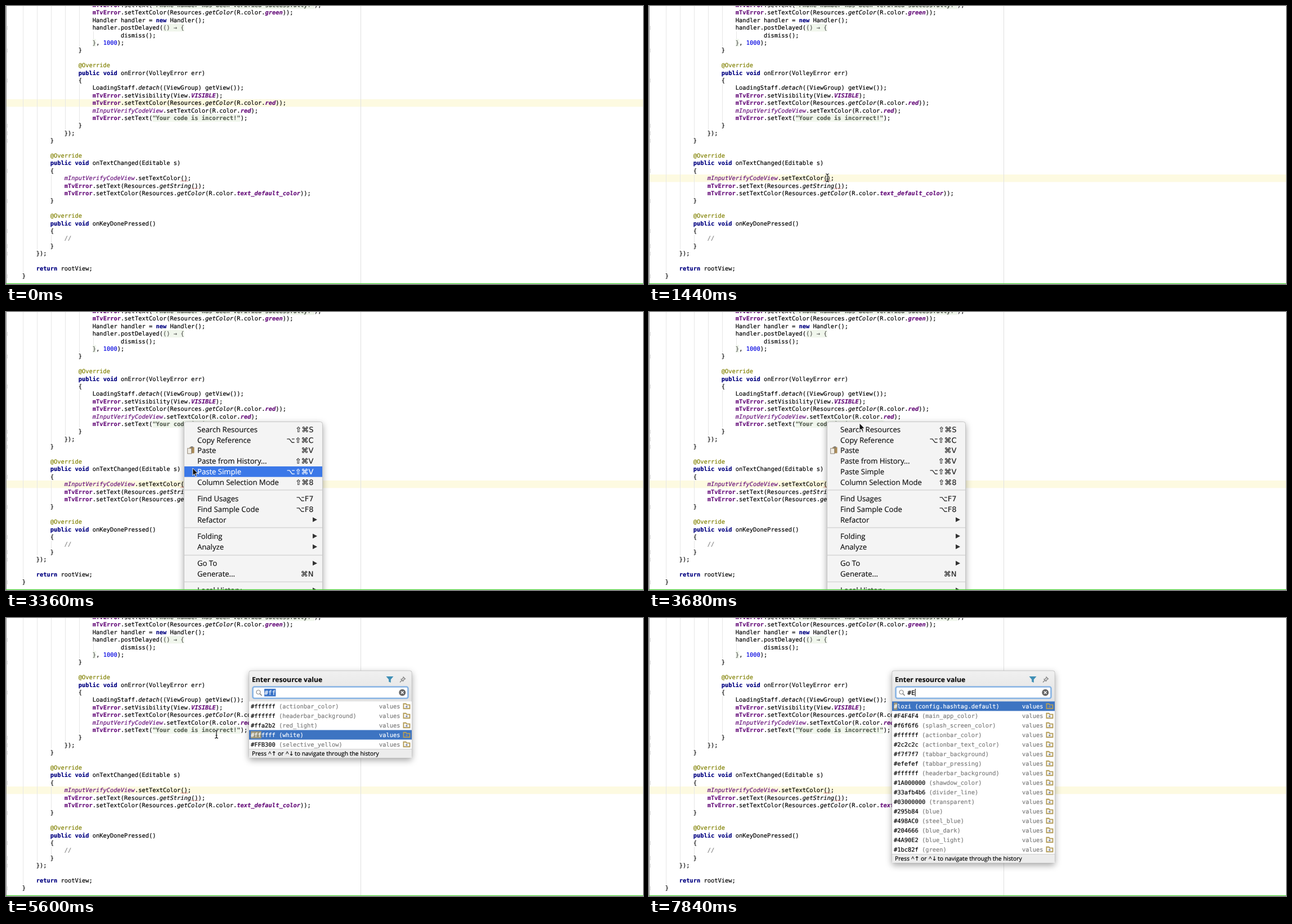
An HTML page that plays this animation: 1132x495 px, repeating every 8000 ms.

```html
<!DOCTYPE html>
<html lang="en">
<head>
<meta charset="utf-8">
<title>Resource search</title>
<style>
  html, body { margin: 0; width: 100%; height: 100%; overflow: hidden; background: #fff; }
  svg { display: block; width: 1132px; height: 495px; }
  text { white-space: pre; text-rendering: geometricPrecision; color: #000; }
  text, tspan { fill: currentColor; stroke: currentColor; stroke-width: .18px; }
  .mono { font: 10.4px "DejaVu Sans Mono", monospace; }
  .field { font: 11px "DejaVu Sans Mono", monospace; }
  .ui { font: 13.1px "Open Sans", "Noto Sans", sans-serif; color: #111; }
  .keys { font: 13px "DejaVu Sans", sans-serif; color: #222; text-anchor: end; }
  .title { font: bold 12.2px "Open Sans", sans-serif; color: #111; }
  .hint { font: 10.4px "Open Sans", "DejaVu Sans", sans-serif; }
  .kw { color: #000080; font-weight: bold; }
  .note { color: #808000; }
  .str { color: #596056; font-weight: bold; }
  .member { color: #660e7a; font-weight: bold; }
  .local { color: #660e7a; font-style: italic; }
  .const { color: #660e7a; font-weight: bold; font-style: italic; }
  .call { font-style: italic; }
  .num { color: #0000e0; }
  .rem { color: #808080; }
  .lambda { color: #555; }
  .dim { color: #7c7c7c; }
  .white, .white .dim { color: #fff; }
  .shadow { filter: drop-shadow(0 4px 6px rgba(0, 0, 0, .35)); }
</style>
</head>
<body>
<svg viewBox="0 0 1132 495">
  <defs>
    <linearGradient id="head" x2="0" y2="1">
      <stop stop-color="#f0f0f0"/><stop offset="1" stop-color="#e2e2e2"/>
    </linearGradient>
    <g id="ibeam" fill="none">
      <path d="M-3-7Q0-7 0-5Q0-7 3-7M0-5V5M-3 7Q0 7 0 5Q0 7 3 7M-1.5 2H1.5" stroke="#fff" stroke-width="2.6"/>
      <path d="M-3-7Q0-7 0-5Q0-7 3-7M0-5V5M-3 7Q0 7 0 5Q0 7 3 7M-1.5 2H1.5" stroke="#111" stroke-width="1.2"/>
    </g>
    <path id="arrow" d="M0 0V13L3 10.2L5 15L7.2 14L5.2 9.4H9.2Z" fill="#111" stroke="#fff" stroke-width=".9"/>
    <g id="folder" fill="none" stroke="#b39c58" stroke-width="1.9">
      <path d="M1 9.4V1H5.2L6.4 2.8H12V9.4Z"/><path d="M4.8 6.2H8" stroke="#7f8aa8" stroke-width="2.8"/>
    </g>
    <g id="bulb">
      <circle cx="16" cy="302.5" r="5.2" fill="#d4626a"/>
      <path d="M16 299.5V303.5M16 304.7V306" stroke="#fff" stroke-width="1.5"/>
      <path d="M14 308.6H18M14.4 310.4H17.6" stroke="#777" stroke-width="1.3"/>
    </g>
  </defs>
  <rect width="1132" height="495" fill="#fff"/>
  <rect id="band" width="1132" height="13.4" fill="#fdfae1"/>
  <g id="page"></g>
  <g id="live"></g>
  <path d="M0 494.4H1132" stroke="#4fd33c" stroke-width="1.2"/>
</svg>
<script>
const TICK = 160, LOOP = 8000;
const CHAR = 6.261, LEFT = 3.6, TOP = -8.2, PITCH = 13.4;
const $ = id => document.getElementById(id);
const colX = c => LEFT + c * CHAR;
const lineY = i => TOP + i * PITCH;

const rect = (x, y, w, h, fill, more = '') =>
  `<rect x="${x}" y="${y}" width="${w}" height="${h}" fill="${fill}" ${more}/>`;
const path = (d, stroke, width = 1) =>
  `<path d="${d}" fill="none" stroke="${stroke}" stroke-width="${width}"/>`;
const text = (x, y, cls, s) => `<text x="${x}" y="${y}" class="${cls}">${s}</text>`;
const use = (id, x = 0, y = 0) => `<use href="#${id}" x="${x}" y="${y}"/>`;

const source = `
                        mTvError.setText("Phone number has been verified successfully!");
                        mTvError.setTextColor(Resources.getColor(R.color.green));
                        Handler handler = new Handler();
                        handler.postDelayed(() → {
                                dismiss();
                        }, 1000);
                    }

                    @Override
                    public void onError(VolleyError err)
                    {
                        LoadingStaff.detach((ViewGroup) getView());
                        mTvError.setVisibility(View.VISIBLE);
                        mTvError.setTextColor(Resources.getColor(R.color.red));
                        mInputVerifyCodeView.setTextColor(R.color.red);
                        mTvError.setText("Your code is incorrect!");
                    }
                });
            }

            @Override
            public void onTextChanged(Editable s)
            {
                mInputVerifyCodeView.setTextColor();
                mTvError.setText(Resources.getString());
                mTvError.setTextColor(Resources.getColor(R.color.text_default_color));
            }

            @Override
            public void onKeyDonePressed()
            {
                //
            }
        });

        return rootView;
    }`.slice(1).split('\n');

const rules = [
  ['str', '"[^"]*"'], ['kw', '\\b(?:new|public|void|return)\\b'], ['note', '@Override'],
  ['member', 'mTvError'], ['local', 'mInputVerifyCodeView'], ['num', '\\b1000\\b'], ['rem', '//'],
  ['call', 'getColor|getString|detach'],
  ['const', '\\b(?:VISIBLE|green|red|text_default_color)\\b'], ['lambda', '\\(\\) → {|}(?=,)']
];
const lexer = new RegExp(rules.map(r => `(${r[1]})`).join('|'), 'g');

function codeLine(line, i) {
  const indent = line.search(/\S/);
  if (indent < 0) return '';
  let back = '';
  const body = line.trim().replace(lexer, (m, ...args) => {
    const cls = rules[args.slice(0, rules.length).findIndex(Boolean)][0];
    const at = args[rules.length];
    if (cls === 'str' || cls === 'lambda')
      back += rect(colX(indent + at), lineY(i), m.length * CHAR, PITCH, '#f0f6ec');
    return `<tspan class="${cls}">${m}</tspan>`;
  });
  return back + text(colX(indent), lineY(i) + 10.2, 'mono', body);
}

const guide = (col, from, to) =>
  path(`M${Math.round(colX(col)) + 1.5} ${lineY(from)}V${lineY(to)}`, '#e6e6e6');

function squiggle(col, i) {
  let d = `M${colX(col)} ${lineY(i) + 12.4}`;
  for (let k = 0; k < 6; k++) d += `l2.08 ${k % 2 ? 1.4 : -1.4}`;
  return path(d, '#c04848', .8);
}

function page() {
  const guides = [[4, 0, 36], [8, 0, 33], [12, 0, 18], [12, 23, 26], [12, 31, 32],
    [16, 0, 17], [20, 0, 6], [20, 11, 16], [24, 4, 5]];
  const folds = [3, 6, 10, 16, 17, 18, 22, 26, 30, 32, 33, 36];
  return path('M.5 0V495', '#8c8c8c') + path('M630.5 0V495', '#e0e0e0') +
    guides.map(g => guide(...g)).join('') +
    folds.map(i => path(`M0 ${lineY(i) + 4}H2.5V${lineY(i) + 10}H0`, '#c4c4c4', .8)).join('') +
    source.map(codeLine).join('') + squiggle(49, 23) + squiggle(52, 24);
}

const menuItems = [
  [209, 'Search Resources', '⇧⌘S'], [228, 'Copy Reference', '⌥⇧⌘C'], [246.7, 'Paste', '⌘V'],
  [265.5, 'Paste from History...', '⇧⌘V'], [284.3, 'Paste Simple', '⌥⇧⌘V'],
  [303, 'Column Selection Mode', '⇧⌘8'], [332.3, 'Find Usages', '⌥F7'],
  [351.2, 'Find Sample Code', '⌥F8'], [370, 'Refactor'], [399.3, 'Folding'], [418.2, 'Analyze'],
  [447.6, 'Go To'], [466.5, 'Generate...', '⌘N'], [495.3, 'Local History']
];

function menu(mouseY) {
  let s = rect(316.5, 195.5, 246, 320, '#f4f4f4', 'rx="4" stroke="#c6c6c6" class="shadow"');
  for (const y of [317, 384, 433, 480.5]) s += path(`M317 ${y}H562`, '#d6d6d6', 1.4);
  for (const [y, label, keys] of menuItems) {
    const on = Math.abs(mouseY - y) < 9.4;
    const tint = on ? ' white' : '';
    if (on) s += rect(317, y - 9.4, 245, 18.8, '#3b78e8');
    s += text(340, y + 4.7, 'ui' + tint, label);
    s += keys ? text(546.5, y + 4.7, 'keys' + tint, keys)
      : `<path d="M545 ${y - 4.5}L553 ${y - .2}L545 ${y + 4}Z" fill="${on ? '#fff' : '#333'}"/>`;
  }
  return s + rect(326, 240.5, 8.5, 11, '#a98a58', 'rx="1"') + rect(328.3, 239.3, 4, 2.4, '#777') +
    rect(322.7, 242.8, 7, 9.4, '#f1eee6', 'stroke="#85796a" stroke-width=".9"');
}

const shortList = ['#ffffff (actionbar_color)', '#ffffff (headerbar_background)',
  '#ffa2b2 (red_light)', '#ffffff (white)', '#FFB300 (selective_yellow)'];
const longList = ['#lozi (config.hashtag.default)', '#F4F4F4 (main_app_color)',
  '#f6f6f6 (splash_screen_color)', '#ffffff (actionbar_color)', '#2c2c2c (actionbar_text_color)',
  '#f7f7f7 (tabbar_background)', '#efefef (tabbar_pressing)', '#ffffff (headerbar_background)',
  '#1A000000 (shawdow_color)', '#33afb4b6 (divider_line)', '#03000000 (transparent)',
  '#295b84 (blue)', '#498AC0 (steel_blue)', '#204666 (blue_dark)', '#4A90E2 (blue_light)',
  '#1bc82f (green)'];

function results(rows, chosen, match) {
  const end = 148.5 + rows.length * 17;
  let s = rect(432, 148.5, 289, end - 148.5, '#fff');
  rows.forEach((row, i) => {
    const y = 148.5 + i * 17, on = i === chosen;
    if (on) s += rect(432, y, 289, 17, '#3d74c2') + rect(435, y + 2, match * CHAR, 13, '#9c967c');
    const label = row.replace(/\(.*/, '<tspan class="dim">$&</tspan>');
    s += text(435, y + 12.3, on ? 'mono white' : 'mono', label) +
      text(663, y + 12.3, on ? 'mono white' : 'mono dim', 'values') +
      use('folder', 705.5, y + 3.3);
  });
  s += rect(432, end, 289, 15.5, '#ececec') + path(`M432 ${end}H721`, '#c8c8c8', .8);
  const hint = [[437, 'Press'], [466, '^↑'], [483, 'or'], [497, '^↓'], [513, 'to navigate through the history']];
  return s + hint.map(([x, w]) => text(x, end + 11.6, 'hint', w)).join('');
}

function popup({ query, selected, caret, rows, chosen, match }) {
  const h = rows ? 70 + rows.length * 17 : 55;
  const caretX = 459.4 + query.length * 6.62;
  let s = rect(432, 94, 289, h, '#e6e6e6', 'rx="3" stroke="#b4b4b4" stroke-width=".8" class="shadow"') +
    rect(432.4, 94.4, 288.2, 54.6, 'url(#head)', 'rx="3"') +
    text(437, 113.6, 'title', 'Enter resource value') +
    '<path d="M675.5 104H688.5L683.8 109.5V115L680.2 113.5V109.5Z" fill="#3f8fb5"/>' +
    path('M700 114.5L703.5 111M701.5 108.5L706 113M703 109.5L706.5 106M705.5 112L708.5 108M705.5 104.5L710 109', '#8c8c8c', 1.5) +
    rect(438.5, 122.5, 276, 20.5, '#fff', 'rx="3" stroke="#86b3e4" stroke-width="2.6"') +
    '<circle cx="448.5" cy="132" r="3.6" fill="none" stroke="#777"/>' +
    path('M451.2 134.8L454.5 138.2', '#777', 1.4) +
    '<circle cx="704.3" cy="132.7" r="6" fill="#666"/>' +
    path('M702 130.4L706.6 135M706.6 130.4L702 135', '#fff', 1.4);
  if (selected) s += rect(459, 126, 20.4, 13.6, '#3a74c8');
  s += text(459.3, 136.8, selected ? 'field white' : 'field', query);
  if (caret) s += rect(caretX, 126, 1, 13.6, '#000');
  return s + (rows ? results(rows, chosen, match) : '');
}

function popupState(n) {
  const old = n < 38;
  return {
    query: n < 37 ? '#ff' : n < 43 ? '' : n < 49 ? '#' : '#E',
    selected: n < 37,
    caret: n < 29 || (n >= 32 && n < 35) || (n >= 37 && n < 41) || (n >= 43 && n < 47) || n >= 49,
    rows: n >= 27 && old ? shortList : n >= 45 ? longList : null,
    chosen: old ? 3 : 0,
    match: old ? 3 : 1
  };
}

const mix = (a, b, p) => a + (b - a) * p;
const ease = p => p * p * (3 - 2 * p);

function mouse(n) {
  if (n < 1 || n >= 37) return null;
  if (n < 20) {
    const p = ease(Math.min((n - 1) / 6, 1));
    return [mix(470, 317, p), mix(190, 306, p)];
  }
  if (n < 24) {
    const p = ease((n - 20) / 3);
    return [mix(317, 374, p), mix(306, 198, p)];
  }
  return [374, 207];
}

function draw(n) {
  const at = mouse(n), inMenu = n >= 20 && n < 25;
  $('band').setAttribute('y', lineY(n < 9 ? 13 : 23));
  let s = '';
  if (n >= 9 && n < 25) s += rect(colX(50) - .5, lineY(23), 1, PITCH, '#000');
  if (n >= 14 && n < 20) s += use('bulb');
  if (inMenu) s += menu(at[1]);
  if (n >= 26) s += popup(popupState(n));
  if (at) s += use(inMenu ? 'arrow' : 'ibeam', ...at);
  $('live').innerHTML = s;
}

$('page').innerHTML = page();
const start = performance.now();
let shown = -1;
function frame() {
  const n = Math.floor((performance.now() - start) % LOOP / TICK);
  if (n !== shown) draw(shown = n);
  requestAnimationFrame(frame);
}
frame();
</script>
</body>
</html>
```
